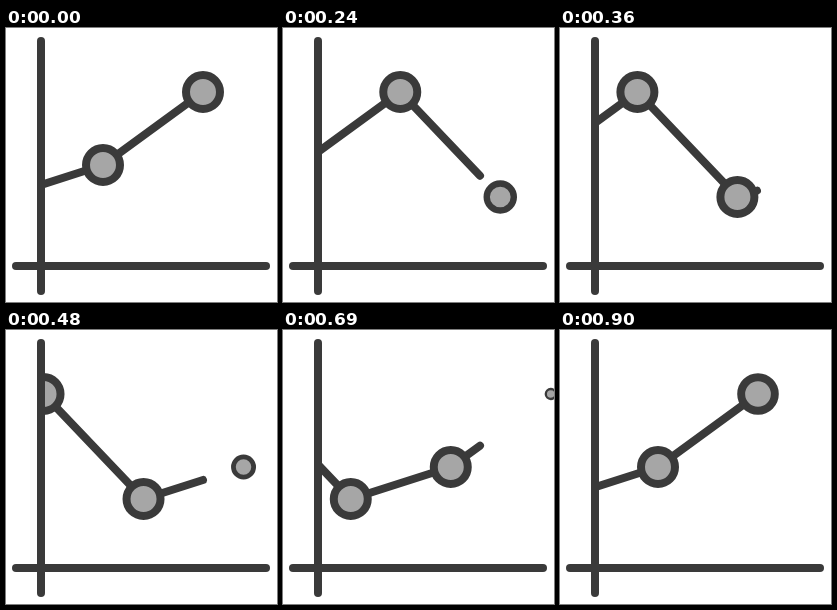
Write an HTML page with a canvas that moves like this. It is 271x274 px and loops after 930 ms.

```html
<!DOCTYPE html>
<html lang="en">
<head>
<meta charset="utf-8">
<title>Scrolling line chart</title>
<style>
  html, body { margin: 0; width: 100%; height: 100%; overflow: hidden; background: #fff; }
  canvas { display: block; }
</style>
</head>
<body>
<canvas id="chart" width="271" height="274"></canvas>
<script>
const canvas = document.getElementById("chart");
const ctx = canvas.getContext("2d");

const DARK = "#3a3a3a";
const LIGHT = "#a6a6a6";
const LOOP = 930;
const STEP = 30;
const SPEED = 299 / 900; // px per ms
const LEFT = 35;
const RIGHT = 197;
const SPACING = 100;
const HEIGHTS = [137, 64, 169];

const nodeX = (i, time) => 97 + i * SPACING - time * SPEED;
const nodeY = i => HEIGHTS[(i + 3) % 3];

function line(x1, y1, x2, y2) {
  ctx.beginPath();
  ctx.moveTo(x1, y1);
  ctx.lineTo(x2, y2);
  ctx.stroke();
}

function drawCurve(time) {
  ctx.beginPath();
  for (let i = -1; i < 6; i++) {
    const x1 = nodeX(i, time);
    const x2 = x1 + SPACING;
    const from = Math.max(x1, LEFT);
    const to = Math.min(x2, RIGHT);
    if (from >= to) continue;
    const yAt = x => nodeY(i) + (nodeY(i + 1) - nodeY(i)) * (x - x1) / SPACING;
    if (from === LEFT) ctx.moveTo(from, yAt(from));
    ctx.lineTo(to, yAt(to));
  }
  ctx.lineWidth = 8;
  ctx.stroke();
}

// Markers grow from nothing as they approach the end of the curve.
function drawMarker(x, y) {
  const scale = Math.min(1, 1 - (x - RIGHT) / SPACING);
  if (scale <= 0) return;
  ctx.beginPath();
  ctx.arc(x, y, 17 * scale, 0, Math.PI * 2);
  ctx.fill();
  ctx.lineWidth = 8 * scale;
  ctx.stroke();
}

function draw(time) {
  ctx.fillStyle = "#fff";
  ctx.fillRect(0, 0, canvas.width, canvas.height);
  ctx.strokeStyle = DARK;
  ctx.fillStyle = LIGHT;
  ctx.lineCap = ctx.lineJoin = "round";

  ctx.save();
  ctx.beginPath();
  ctx.rect(LEFT, 0, canvas.width - LEFT, canvas.height);
  ctx.clip();
  drawCurve(time);
  for (let i = -1; i < 6; i++) drawMarker(nodeX(i, time), nodeY(i));
  ctx.restore();

  ctx.lineWidth = 8;
  line(LEFT, 13, LEFT, 263);
  line(10, 238, 260, 238);
}

function tick() {
  const time = performance.now() % LOOP;
  draw(Math.floor(time / STEP) * STEP);
  requestAnimationFrame(tick);
}
tick();
</script>
</body>
</html>
```
